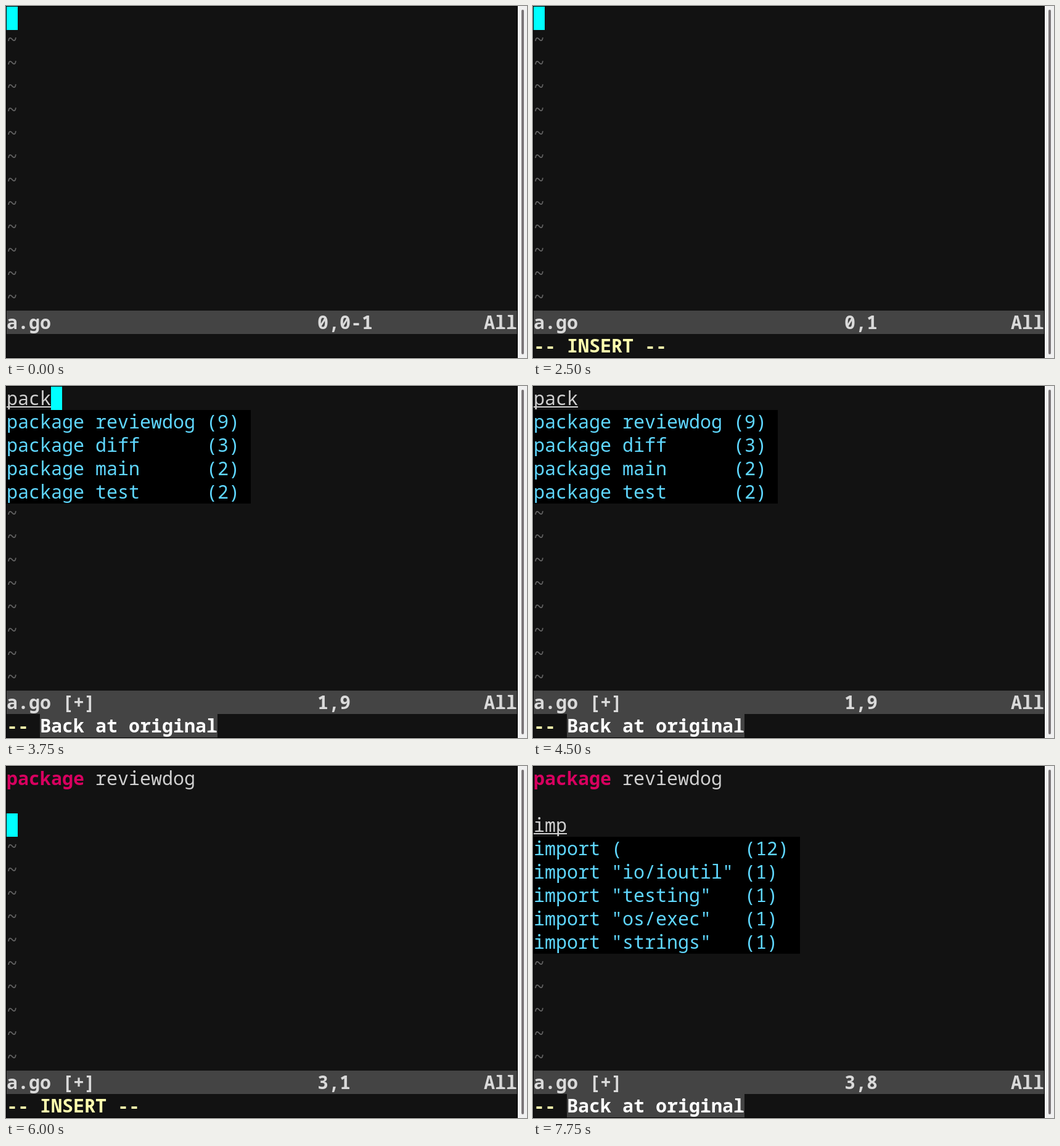
Recreate the animation shown at these times as an HTML page. Size 845 by 572 pixels, loop 8000 ms.

```html
<!DOCTYPE html>
<html lang="en">
<head>
<meta charset="utf-8">
<title>Line completion in the editor</title>
<style>
  html, body { margin: 0; width: 100%; height: 100%; overflow: hidden; background: #000; }
  #stage { position: relative; width: 845px; height: 572px; overflow: hidden; background: #000; }
  #term {
    position: absolute; left: 1px; top: 1px; width: 828px; height: 570px;
    overflow: hidden; background: #121212; color: #d0d0d0;
    font: 400 30px/38px "Noto Sans Mono", "DejaVu Sans Mono", monospace;
    font-variant-ligatures: none;
  }
  #term div { position: absolute; height: 38px; white-space: pre; }
  #term .tilde { color: #626262; line-height: 32px; }
  #term .cursor { width: 18px; background: #0ff; }
  #term .bar { width: 828px; background: #444; }
  #term .status { color: #dadada; font-weight: 600; }
  #term .mode { color: #ffffaf; font-weight: 600; }
  #term .key { color: #d7005f; font-weight: 700; }
  #term .bad { text-decoration: underline 2px; text-underline-offset: 2px; text-decoration-skip-ink: none; }
  #term .menu { color: #5fd7ff; background: #000; }
  #term .picked { color: #eee; background: #6c6c6c; }
  #term .match { color: #5fd7ff; }
  #term .warn { color: #fff; background: #444; font-weight: 600; }
  #scroll { position: absolute; left: 830px; top: 0; width: 15px; height: 572px; background: #f0f0f0; }
  #scroll::before { content: ""; position: absolute; left: 0; top: 0; width: 2px; height: 572px; background: #fff; }
  #scroll::after {
    content: ""; position: absolute; left: 6px; top: 6px; width: 4px; height: 560px;
    border-radius: 2px; background: #7a7577;
  }
</style>
</head>
<body>
<div id="stage"><div id="term"></div><div id="scroll"></div></div>
<script>
const LOOP = 8000, COL = 18, ROW = 38;
const term = document.getElementById("term");

const INSERT = ["mode", "-- INSERT --"];
const EXPAND = ["mode", "-- ^X mode (^]^D^E^F^I^K^L^N^O^Ps^U^V^Y)"];
const BACK = ["warn", "Back at original"];
const MATCH = ["match", "match 1 of 4"];

const packages = [
  "package reviewdog (9) ", "package diff      (3) ",
  "package main      (2) ", "package test      (2) "
];
const imports = [
  "import (           (12) ", 'import "io/ioutil" (1)  ', 'import "testing"   (1)  ',
  'import "os/exec"   (1)  ', 'import "strings"   (1)  '
];
const done = "package reviewdog";

// Each step changes only the listed parts of the screen.
const steps = [
  { at: 0, lines: [""], cursor: [0, 0], on: true, pos: "0,0-1", msg: null, menu: null, pick: -1 },
  { at: 500, on: false },
  { at: 1250, on: true },
  { at: 1750, on: false },
  { at: 2250, on: true },
  { at: 2500, pos: "0,1", msg: INSERT },
  { at: 3000, lines: ["pa"], cursor: [2, 0], pos: "1,3" },
  { at: 3250, lines: ["pack"], cursor: [4, 0], pos: "1,5" },
  { at: 3500, msg: EXPAND },
  { at: 3750, menu: packages, pos: "1,9", msg: BACK },
  { at: 4500, on: false },
  { at: 5000, lines: [done], cursor: [17, 0], on: true, pick: 0, msg: MATCH },
  { at: 5500, on: false },
  { at: 5750, lines: [done, ""], cursor: [0, 1], on: true, pos: "2,1", menu: null, pick: -1, msg: INSERT },
  { at: 6000, lines: [done, "", ""], cursor: [0, 2], pos: "3,1" },
  { at: 6250, lines: [done, "", "i"], cursor: [1, 2], pos: "3,2" },
  { at: 6500, lines: [done, "", "im"], cursor: [2, 2], pos: "3,3" },
  { at: 6750, lines: [done, "", "imp"], cursor: [3, 2], pos: "3,4" },
  { at: 7000, msg: EXPAND },
  { at: 7250, menu: imports, pos: "3,8", msg: BACK },
  { at: 7750, on: false }
];
const screens = [];
steps.forEach((step, i) => screens.push({ ...screens[i - 1], ...step }));

function put(col, row, cls, text = "") {
  const el = document.createElement("div");
  el.className = cls;
  el.textContent = text;
  el.style.left = col * COL + "px";
  el.style.top = row * ROW + "px";
  term.append(el);
}

function putLine(text, row) {
  if (text === done) {
    put(0, row, "key", "package");
    put(8, row, "", "reviewdog");
  } else if (text) {
    put(0, row, "bad", text);
  }
}

function draw(s) {
  term.replaceChildren();
  s.lines.forEach(putLine);
  for (let row = s.lines.length; row < 13; row++) put(0, row, "tilde", "~");
  if (s.menu) {
    s.menu.forEach((item, i) =>
      put(0, s.lines.length + i, i === s.pick ? "menu picked" : "menu", item));
  }
  if (s.on) put(...s.cursor, "cursor");

  put(0, 13, "bar");
  put(0, 13, "status", s.lines[0] ? "a.go [+]" : "a.go");
  put(28, 13, "status", s.pos);
  put(43, 13, "status", "All");

  if (!s.msg) return;
  const [cls, text] = s.msg;
  if (cls !== "mode") put(0, 14, "mode", "--");
  put(cls === "mode" ? 0 : 3, 14, cls, text);
}

let shown = null;
function tick() {
  const t = performance.now() % LOOP;
  const screen = screens.findLast(s => s.at <= t);
  if (screen !== shown) draw(shown = screen);
  requestAnimationFrame(tick);
}
tick();
</script>
</body>
</html>
```
